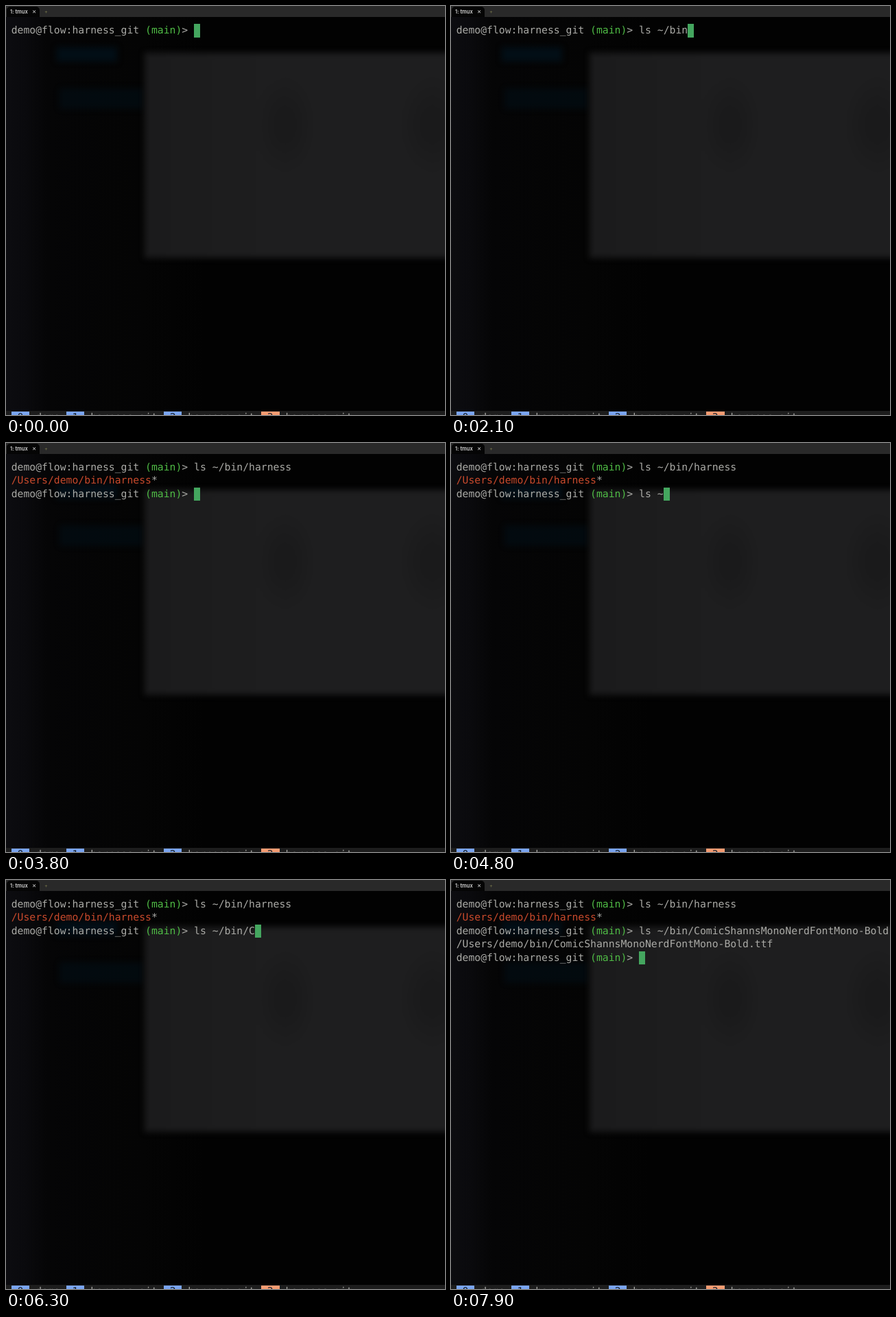
Recreate the animation shown at these times as an HTML page. Size 640x596 px, loop 8 s.

```html
<!DOCTYPE html>
<html lang="en">
<head>
<meta charset="utf-8">
<title>Terminal</title>
<style>
  html, body { margin: 0; width: 100%; height: 100%; overflow: hidden; background: #020202; }
  #stage { position: relative; width: 640px; height: 596px; overflow: hidden; background: #020202; }
  #stage div { position: absolute; }
  .edge { left: 0; top: 16px; width: 290px; height: 580px;
    background: linear-gradient(90deg, #0c0c10, #0a0a0d 28px, #050506 60px, #040404 200px, #020202); }
  .panel { left: 202px; top: 68px; width: 460px; height: 299px; filter: blur(4px);
    background:
      radial-gradient(ellipse 45px 75px at 205px 105px, #1a1a1b 30%, transparent),
      radial-gradient(ellipse 50px 75px at 420px 105px, #1a1a1b 30%, transparent),
      linear-gradient(90deg, #1b1b1c, #1e1e1f 40%, #1e1e1f); }
  .glow { background: #020e16; filter: blur(4px); }
  .bar { left: 0; top: 0; width: 640px; height: 16px; background: #292929; }
  .tab { left: 1px; top: 1px; width: 48px; height: 15px; border-radius: 5px 5px 0 0; background: #050505; }
  .label { top: 2px; font: 600 7.5px/13px Inter, sans-serif; color: #d6d6d6; white-space: pre; }
  .row { left: 7.7px; height: 19.45px; white-space: pre; color: #aaaaa6;
    font: 14.755px/19.45px "DejaVu Sans Mono", monospace; text-rendering: geometricPrecision;
    font-variant-ligatures: none; }
  .branch { color: #4fbb45; }
  .exec { color: #c94a2c; }
  .badge { background: #7aa5f2; color: #16202c; }
  .badge.on { background: #f79c72; }
  .status { left: 0; top: 590px; width: 640px; height: 6px; background: #1d1d1d; }
  #cursor { left: 274px; width: 9px; height: 19.5px; background: #44a65f; }
</style>
</head>
<body>
<div id="stage">
  <div class="edge"></div>
  <div class="glow" style="left:74px;top:60px;width:88px;height:21px"></div>
  <div class="glow" style="left:78px;top:120px;width:122px;height:30px;opacity:.6"></div>
  <div class="panel"></div>
  <div class="bar"></div>
  <div class="tab"></div>
  <div class="label" style="left:6px">1: tmux</div>
  <div class="label" style="left:38px;font-weight:400">✕</div>
  <div class="label" style="left:56px;font-weight:400;color:#77754a">+</div>
  <div class="status"></div>
  <div id="cursor"></div>
  <div id="screen"></div>
</div>
<script>
const LOOP = 8000, TOP = 26, LINE = 19.45, LEFT = 7.7, CELL = 8.883;
const PROMPT_CELLS = 30;
const FONT_FILE = 'ComicShannsMonoNerdFontMono-Bold.ttf';
const screen = document.getElementById('screen');
const cursor = document.getElementById('cursor');

const prompt = 'demo@flow:harness_git <span class="branch">(main)</span>&gt; ';

// One time per typed character; an optional completion arrives at once.
const commands = [
  { text: 'ls ~/bin/harness',
    keys: [600, 800, 1000, 1200, 1400, 1600, 1800, 1900,
           2200, 2400, 2600, 2800, 3100, 3200, 3300, 3400],
    enter: 3600,
    output: '<span class="exec">/Users/demo/bin/harness</span>*' },
  { text: 'ls ~/bin/Com',
    keys: [4100, 4300, 4500, 4700, 4900, 5200, 5400, 5600, 5900, 6200, 6500, 6900],
    complete: { at: 7200, text: 'ls ~/bin/' + FONT_FILE },
    enter: 7500,
    output: '/Users/demo/bin/' + FONT_FILE }
];

function addRow(parent, index) {
  const row = document.createElement('div');
  row.className = 'row';
  row.style.top = TOP + index * LINE + 'px';
  parent.appendChild(row);
  return row;
}

const rows = Array.from({ length: 5 }, (_, i) => addRow(screen, i));

addRow(screen, 29).innerHTML = ['demo', 'harness_git', 'harness_git', 'harness_git']
  .map((name, i) => `<span class="badge${i === 3 ? ' on' : ''}"> ${i} </span> ${name} `)
  .join('');

function typed(command, t) {
  if (command.complete && t >= command.complete.at) return command.complete.text;
  return command.text.slice(0, command.keys.filter(at => at <= t).length);
}

function linesAt(t) {
  const lines = [];
  for (const command of commands) {
    const text = typed(command, t);
    lines.push(prompt + text);
    if (t < command.enter) return { lines, column: text.length };
    lines.push(command.output);
  }
  lines.push(prompt);
  return { lines, column: 0 };
}

let shown = '';
function draw(now) {
  const { lines, column } = linesAt(now % LOOP);
  const key = lines.join('\n');
  if (key !== shown) {
    rows.forEach((row, i) => { row.innerHTML = lines[i] || ''; });
    cursor.style.left = LEFT + (PROMPT_CELLS + column) * CELL + 'px';
    cursor.style.top = TOP + (lines.length - 1) * LINE + 'px';
    shown = key;
  }
}

const start = performance.now();
function tick() {
  draw(performance.now() - start);
  requestAnimationFrame(tick);
}
tick();
</script>
</body>
</html>
```
